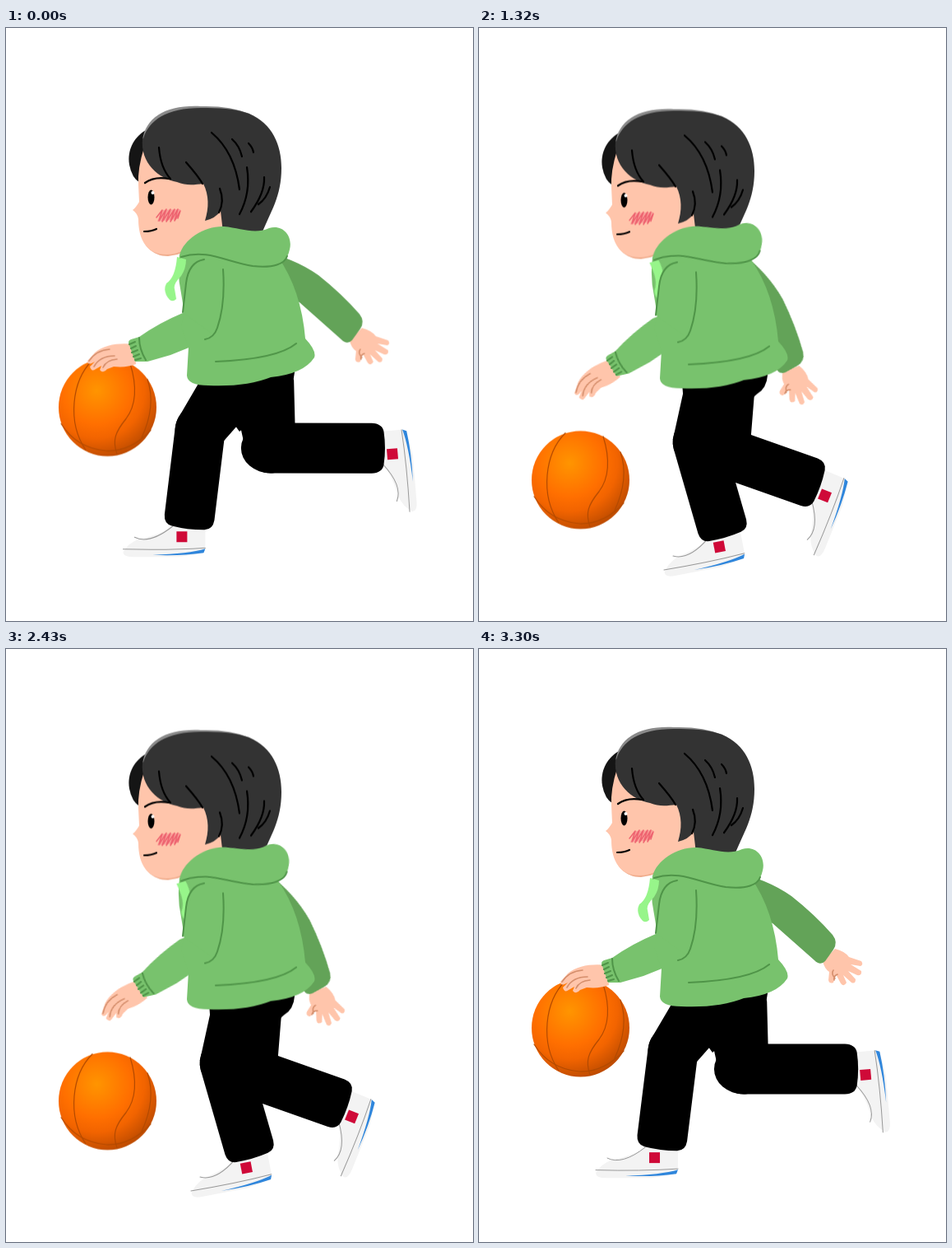
Write an HTML page that moves like this. It is 568x720 px and loops after 3.33 s.

```html
<!DOCTYPE html>
<html lang="en">
<head>
<meta charset="utf-8">
<title>Dribbling run</title>
<style>
html, body { margin: 0; width: 100%; height: 100%; overflow: hidden; background: #fff; }
svg { display: block; width: 568px; height: 720px; }

@property --kx { syntax: "<length>"; inherits: true; initial-value: 0px; }
@property --ky { syntax: "<length>"; inherits: true; initial-value: 0px; }
@property --thigh { syntax: "<angle>"; inherits: true; initial-value: 0deg; }
@property --shin { syntax: "<angle>"; inherits: true; initial-value: 0deg; }
@property --len { syntax: "<number>"; inherits: true; initial-value: 110; }
@property --foot { syntax: "<angle>"; inherits: true; initial-value: 0deg; }

.leg, .body, .far-arm, .hood, .forearm, .hand, .cord, .ball {
  animation: 1110ms linear infinite;
}

/* Legs: knee position, then thigh, shin and foot turn around it */
.leg { transform: translate(var(--kx), var(--ky)); }
.thigh { transform: rotate(var(--thigh)); }
.shin { transform: rotate(var(--shin)); }
.calf { transform: scaleY(calc(var(--len) / 110)); }
.foot { transform: translateY(calc(var(--len) * 1px)) rotate(var(--foot)); }
.leg.a { animation-name: leg-a; }
.leg.b { animation-name: leg-b; }
@keyframes leg-a {
  0%, 97.297%, 100% { --kx: 236px; --ky: 488px; --thigh: 36deg; --shin: 7.1deg; --len: 113; --foot: -7.1deg; }
  18.919% { --kx: 266px; --ky: 503px; --thigh: 18deg; --shin: -16deg; --len: 112.5; --foot: 5.4deg; }
  48.649% { --kx: 325px; --ky: 499px; --thigh: -10deg; --shin: -64deg; --len: 111; --foot: -4deg; }
  70.27% { --kx: 311px; --ky: 504px; --thigh: -3deg; --shin: -62deg; --len: 112; --foot: -6deg; }
}
@keyframes leg-b {
  0%, 97.297%, 100% { --kx: 322px; --ky: 510px; --thigh: -7deg; --shin: -90deg; --len: 130; --foot: -5deg; }
  18.919% { --kx: 299px; --ky: 515px; --thigh: -1deg; --shin: -70.8deg; --len: 115.4; --foot: 2.8deg; }
  48.649% { --kx: 223px; --ky: 490px; --thigh: 40deg; --shin: 14.2deg; --len: 111.7; --foot: -.2deg; }
  70.27% { --kx: 259px; --ky: 500px; --thigh: 21deg; --shin: -4.6deg; --len: 123.5; --foot: 4.6deg; }
}

.body { animation-name: bob; }
@keyframes bob {
  0%, 48.649%, 97.297%, 100% { transform: translateY(0); }
  18.919% { transform: translateY(3.5px); }
  70.27% { transform: translateY(-4.5px); }
}
.far-arm { transform-origin: 318px 290px; animation-name: far-arm; }
@keyframes far-arm {
  0%, 97.297%, 100% { transform: rotate(0deg); }
  18.919% { transform: rotate(25.5deg); }
  48.649% { transform: rotate(96deg); }
  70.27% { transform: rotate(41deg); }
}
.cord { transform-origin: 214px 281px; animation-name: cord; }
@keyframes cord {
  0%, 97.297%, 100% { transform: rotate(0deg); }
  18.919% { transform: rotate(-32deg); }
  48.649% { transform: rotate(29deg); }
  70.27% { transform: rotate(-12deg); }
}

/* Parts that repeat on every step */
.hood { transform-origin: 215px 277px; --turn: -4.5deg; animation-name: turn; }
.forearm { transform-origin: 228px 365px; --turn: -12.5deg; animation-name: turn; }
.hand { transform-origin: 152px 390px; --turn: -11deg; animation-name: turn; }
@keyframes turn {
  0%, 48.649%, 97.297%, 100% { transform: rotate(0deg); }
  18.919%, 70.27% { transform: rotate(var(--turn)); }
}
.ball { animation-name: bounce; }
@keyframes bounce {
  0%, 48.649%, 97.297%, 100% { transform: translateY(0); }
  18.919%, 70.27% { transform: translateY(89px); }
}

.green { fill: #78c26d; }
.skin { fill: #ffc5ab; }
.line { fill: none; stroke-linecap: round; stroke-linejoin: round; }
.seam { stroke: #4f9448; stroke-width: 2; }
.ink { stroke: #000; stroke-width: 2.2; }
.crease { stroke: #d58e6c; stroke-width: 1.6; }
</style>
</head>
<body>
<svg viewBox="0 0 568 720">
  <defs>
    <radialGradient id="rubber" cx=".39" cy=".33" r=".7">
      <stop offset="0" stop-color="#ff9500"/>
      <stop offset=".5" stop-color="#ff6f00"/>
      <stop offset=".7" stop-color="#f26400"/>
      <stop offset="1" stop-color="#bd4b00"/>
    </radialGradient>
    <g id="shoe">
      <path fill="#f3f3f3" d="M-18 -2C-22 10 -40 16 -60 20Q-74 25 -80 36Q-80 42 -68 42L-12 42L18 37L20 28V-2Z"/>
      <path class="line" stroke="#999" d="M-80 32.5Q-25 34 20 31M-66 18Q-48 27 -20 5"/>
      <path fill="#2f86dc" d="M-44 39.5Q0 38 20 32L18 37Q-10 41 -44 39.5Z"/>
      <rect x="-15" y="11" width="13" height="13" fill="#cf0a38"/>
    </g>
    <g id="leg">
      <g class="shin">
        <g class="foot"><use href="#shoe"/></g>
        <path class="calf" d="M-30.5 0A30.5 30.5 0 0 1 30.5 0L30.5 104Q30 115 20 116.5Q0 119 -20 116.5Q-30 115 -30.5 104Z"/>
      </g>
      <path class="thigh" d="M-30.5 0L-38 -78A38 38 0 0 1 38 -78L30.5 0A30.5 30.5 0 0 1 -30.5 0Z"/>
    </g>
  </defs>

  <g class="body">
    <g class="far-arm">
      <path class="skin" d="M433 364Q445 367 450 374L465 379Q468 383 464 385L452 383L465 391Q466 397 460 396L449 391L458 401Q458 407 453 405L443 396L447 405Q444 411 440 406L434 395L431 405Q426 407 425 402L426 392Q420 388 418 379Z"/>
      <path class="line crease" d="M432 402Q431 397 436 395M433 400Q428 394 431 390"/>
      <path fill="#63a358" d="M310 271Q350 279 380 300Q408 322 430 347Q437 356 431 365L421 379Q415 385 408 378L357 333L304 306Z"/>
    </g>
  </g>

  <g class="leg b"><use href="#leg"/></g>
  <g class="leg a"><use href="#leg"/></g>

  <g class="ball">
    <circle cx="123.5" cy="460" r="59.5" fill="url(#rubber)"/>
    <g class="line" stroke="#b34a00" stroke-width="1.2">
      <path d="M105 403C80 428 74 478 97 512M151 407C160 436 158 458 146 474C133 490 129 500 135 517"/>
      <path d="M172 426Q183 458 165 497M67 480Q86 510 122 513Q152 514 176 488"/>
    </g>
  </g>

  <g class="body">
    <path d="M245 400H351V418Q350 434 338 441L284 490L248 440Z"/>

    <!-- head -->
    <path fill="#151515" d="M176 121C155 130 147 149 150 166Q153 182 163 188L172 150Z"/>
    <path fill="#f0ac8c" d="M163 240C164 264 178 277 197 277Q218 275 235 262L240 230Z"/>
    <path class="skin" d="M168 145Q160 170 161 190L162 211Q158 218 154 221Q160 225 161 232C161 258 172 275 195 275Q206 275 216 270L268 262V170Z"/>
    <path fill="#8a8a8a" d="M166 136C170 108 195 93 237 95Q272 94 296 104L230 110Z"/>
    <path fill="#333" d="M167 134C174 112 195 97 237 97Q275 96 296 104C324 116 335 142 335 170C335 205 322 222 311 250L264 248L261 222Q255 231 242 234C247 218 247 203 240 189C230 190 220 192 208 187C186 183 163 164 166 134Z"/>
    <path class="line ink" d="M250 127C268 142 280 165 284 196M275 135Q284 143 287 156M295 140Q300 145 301 151M186 145Q188 170 200 183M219 163Q234 180 239 189M293 169Q298 200 284 226M314 181Q315 200 298 223M321 193Q317 207 307 214M260 195Q266 210 259 224"/>
    <path class="line ink" d="M169 188Q180 180 198 183M168 247Q177 247 183 244"/>
    <ellipse cx="176.5" cy="205.5" rx="4" ry="9"/>
    <circle cx="178.5" cy="200" r="2" fill="#fff"/>
    <path fill="#f5808a" opacity=".55" d="M189 221L212 220L208 232L184 235Z"/>
    <path class="line" stroke="#ee6470" stroke-width="1.5" d="M183 230L190 221L186 234L195 220L190 235L200 220L195 235L205 220L200 235L209 220L205 234L212 222L209 231"/>

    <!-- near arm -->
    <g class="forearm">
      <g class="hand">
        <path class="skin" d="M156 384C138 382 120 384 108 394L99 404Q99 409 104 407L108 405L102 411Q104 418 109 414L116 410L114 415Q118 420 123 414L131 411C142 412 150 411 158 408Z"/>
        <path class="line crease" d="M101 404Q110 391 126 390M107 411Q114 398 132 398M118 412Q122 403 135 402"/>
      </g>
      <path class="green" d="M149 382Q149 379 152 378L162 375Q186 358 215 346Q240 340 248 366L230 385L200 397L172 405L157 405Z"/>
      <path class="line seam" d="M162 376Q162 390 170 403M150 384L157 381M152 389L158 386M153 394L160 391M155 399L162 396M157 403L164 401"/>
    </g>

    <!-- hoodie -->
    <path class="green" d="M211 275Q208 300 213 322L217 346L213 362L222 388L220 422Q221 434 246 434Q292 436 322 424Q362 420 375 400Q378 392 364 377Q359 318 331 278L310 262H230Z"/>
    <g class="cord">
      <path fill="#97f58a" d="M208 278L219 281Q219 292 213 301Q203 311 205 317L207 329Q203 333 199 330Q190 320 195 310Q206 303 208 278Z"/>
    </g>
    <path class="green" d="M241 281Q222 284 219 310L215 345L250 370V281Z"/>
    <path class="line seam" d="M241 281Q222 284 219 310L215 345M264 293Q267 335 257 364Q253 376 242 378M255 405Q330 402 353 383"/>
    <g class="hood">
      <path class="green" d="M211 276C216 256 242 240 265 241C286 243 302 251 320 243C338 238 349 254 345 269C342 284 330 291 318 290C296 291 270 282 245 276Q227 272 211 280Z"/>
      <path class="line seam" d="M213 278C245 268 268 284 300 289C326 292 339 286 342 277"/>
    </g>
  </g>
</svg>
</body>
</html>
```
